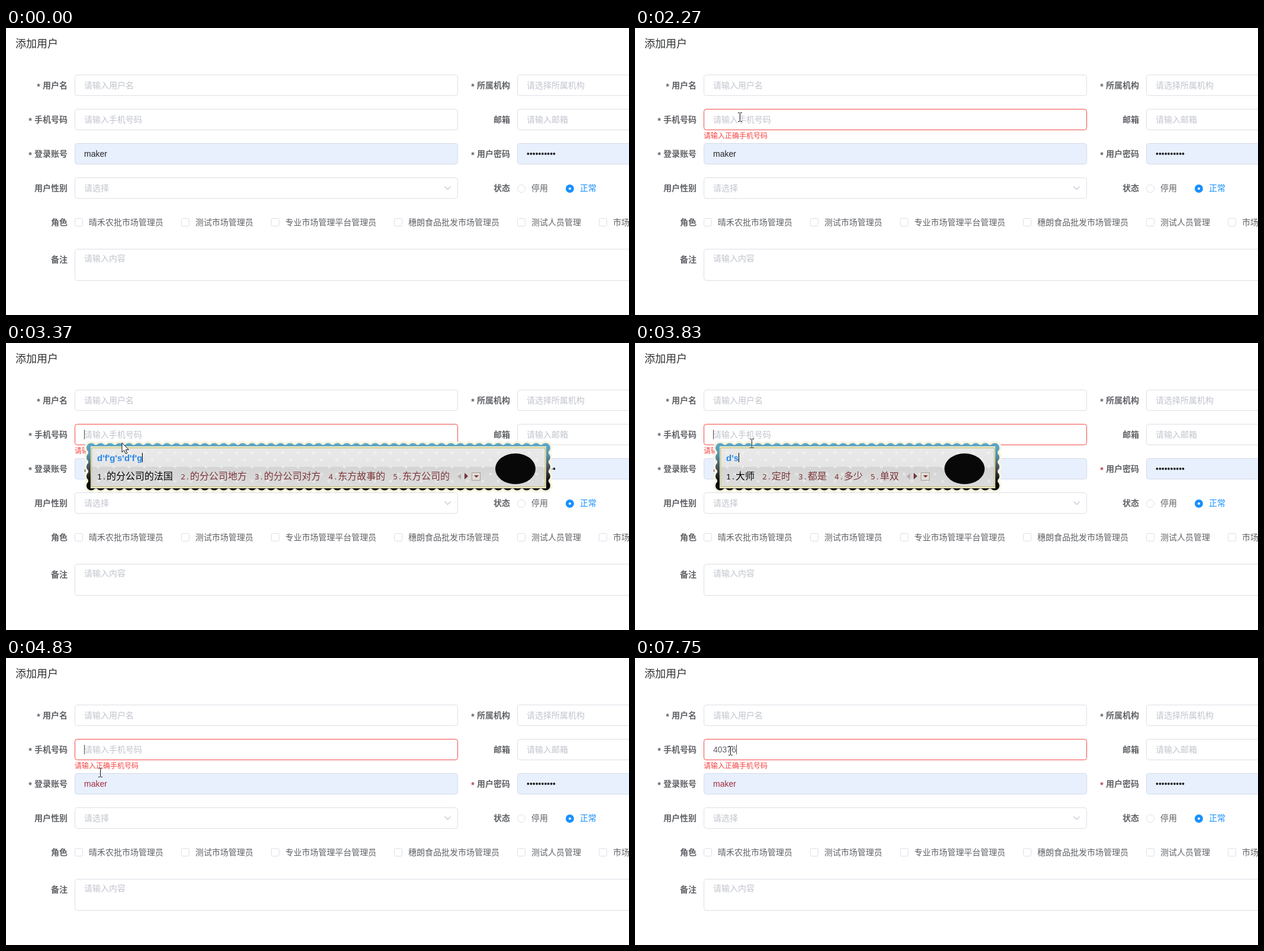
Animation of 1053x486 px, one loop 8 s. Source, as an HTML page:

```html
<!DOCTYPE html>
<html lang="zh-CN">
<head>
<meta charset="utf-8">
<title>添加用户</title>
<style>
html, body { margin: 0; width: 100%; height: 100%; overflow: hidden; background: #fff; }
svg { display: block; width: 1053px; height: 486px; }
text { font: 14px "Liberation Sans", "Noto Sans CJK SC", "Noto Sans CJK", sans-serif; fill: #606266; white-space: pre; }
.title { font-size: 18px; font-weight: 350; fill: #303133; }
.label { font-weight: 700; text-anchor: end; }
.star { font-weight: 700; }
.hint { fill: #c0c4cc; }
.light { font-weight: 300; }
.dark { fill: #222; }
.blue { fill: #1890ff; }
.error { font-size: 12px; fill: #f5413f; }
.box { fill: #fff; stroke: #dcdfe6; }
.filled { fill: #e8f0fe; stroke: #d5dbe8; }
.pinyin { font-size: 15px; font-weight: 700; fill: #2488ec; }
.cand { font-size: 16px; font-weight: 350; fill: #7c3438; }
.num { font: 13.33px "Noto Sans Mono", monospace; fill: #7c3438; }
.first { fill: #000; }
</style>
</head>
<body>
<svg viewBox="0 0 1053 486">
  <defs>
    <linearGradient id="edge" gradientUnits="userSpaceOnUse" x1="0" y1="169" x2="0" y2="250">
      <stop offset=".08" stop-color="#5ba5c5"/><stop offset=".25" stop-color="#5793ad"/>
      <stop offset=".55" stop-color="#454b50"/><stop offset=".8" stop-color="#0b0b0b"/>
    </linearGradient>
    <linearGradient id="panel" x1="0" y1="0" x2="0" y2="1">
      <stop offset="0" stop-color="#e9e9e9"/><stop offset=".48" stop-color="#e5e5e5"/>
      <stop offset=".5" stop-color="#d4d4d4"/><stop offset="1" stop-color="#dcdcdc"/>
    </linearGradient>
    <pattern id="dots" x="150" y="180" width="26" height="24" patternUnits="userSpaceOnUse">
      <g fill="#fff" opacity=".35"><circle cx="6" cy="6" r="2.6"/><circle cx="19" cy="18" r="2.6"/></g>
    </pattern>
  </defs>
  <g id="form"></g>
  <text id="value" x="132" y="160"></text>
  <path id="caret" stroke="#444" d="M.5 147v16"/>
  <g id="ime"></g>
  <circle id="click" r="12" fill="#fff33a" style="mix-blend-mode:multiply"/>
  <g id="mouse">
    <path id="arrow" d="M0 0V16L3.7 12.6 6.3 18.5 8.8 17.4 6.3 11.7H11.3Z" fill="#fff" stroke="#111"/>
    <g id="beam" fill="none">
      <path stroke="#fff" stroke-width="3" opacity=".5" d="M.5-7v14"/>
      <path stroke="#111" d="M-3-7.5H-.5L.5-6.5 1.5-7.5H4M.5-7V7M-3 7.5H-.5L.5 6.5 1.5 7.5H4"/>
    </g>
  </g>
</svg>
<script>
const $ = id => document.getElementById(id);
const LOOP = 8000;
const text = (x, y, s, cls = "", extra = "") => `<text x="${x}" y="${y}" class="${cls}" ${extra}>${s}</text>`;
const rect = (x, y, w, h, cls, extra = "") =>
  `<rect x="${x + .5}" y="${y + .5}" width="${w - 1}" height="${h - 1}" class="${cls}" ${extra}/>`;
const field = (x, y, cls = "", extra = "") => rect(x, y, 648, 36, "box " + cls, `rx="4" ${extra}`);

function label(right, y, s, required, starId = "") {
  const star = required ? text(right - s.length * 14 - 9.7, y + 2, "*", "star", `id="${starId}"`) : "";
  return star + text(right, y, s, "label");
}

function drawForm() {
  const roles = [[116, "晴禾农批市场管理员"], [296, "测试市场管理员"], [448, "专业市场管理平台管理员"],
    [656, "穗朗食品批发市场管理员"], [864, "测试人员管理"], [1002, "市场管理员"]];
  $("form").innerHTML =
    text(16, 33, "添加用户", "title") +
    label(104, 102, "用户名", true) + field(116, 79) + text(132, 102, "请输入用户名", "hint") +
    label(852, 102, "所属机构", true) + field(864, 79) + text(880, 102, "请选择所属机构", "hint") +
    label(104, 160, "手机号码", true) + field(116, 137, "", 'id="phone"') +
    text(132, 160, "请输入手机号码", "hint", 'id="hint"') +
    label(852, 160, "邮箱") + field(864, 137) + text(880, 160, "请输入邮箱", "hint") +
    text(116, 187, "请输入正确手机号码", "error", 'id="error"') +
    label(104, 218, "登录账号", true) + field(116, 195, "filled") + text(132, 218, "maker", "dark", 'id="account"') +
    label(852, 218, "用户密码", true, "star") + field(864, 195, "filled") + text(880, 218, "•".repeat(10), "dark") +
    label(104, 276, "用户性别") + field(116, 253) + text(132, 276, "请选择", "hint") +
    '<path d="M741.5 268.5l5 5 5-5" fill="none" stroke="#c0c4cc" stroke-width="1.2"/>' +
    label(852, 276, "状态") + '<circle cx="871" cy="272" r="6.5" class="box"/>' + text(888, 276, "停用") +
    '<circle cx="953" cy="272" r="7" class="blue"/><circle cx="953" cy="272" r="2" fill="#fff"/>' +
    text(970, 276, "正常", "blue") +
    label(104, 334, "角色") +
    roles.map(([x, s]) => rect(x, 322, 14, 14, "box", 'rx="2"') + text(x + 24, 334, s)).join("") +
    label(104, 397, "备注") + rect(116, 374, 1000, 54, "box", 'rx="4"') + text(132, 395, "请输入内容", "hint light");
}

// Input method states: start time, typed letters, candidates
const imeSteps = [
  [0, "", ""],
  [2820, "d", "的 大 地 都 到"],
  [2890, "df", "地方 对方 东方 大风 等"],
  [2960, "dfg", "东方故 地方官 东方 大风 的"],
  [3030, "dfgs", "东方故事 东方公司 地方公司 对方 的"],
  [3090, "dfgsd", "的分公司的 的分公司等 东方故事 东方公司 电饭锅"],
  [3180, "dfgsdf", "的分公司地方 的分公司对方 东方故事 东方公司 电饭锅"],
  [3250, "dfgsdfg", "的分公司的法国 的分公司地方 的分公司对方 东方故事的 东方公司的"],
  [3450, "dfgsdf", "的分公司地方 的分公司的 东方故事 东方公司 东方故事"],
  [3760, "d", "的 大 地 都 到"],
  [3830, "ds", "大师 定时 都是 多少 单双"],
  [3900, "dsf", "大师傅 第三方 都是 多少 单双"],
  [3970, "dsfd", "第三方的 大师傅的 第三方 大师傅 都是"],
  [4040, "dsfds", "第三方的是 大师傅都是 第三方的 大师傅的 第三方"],
  [4160, "", ""],
  [4230, "f", "飞 发 放 ︿(￣︶￣)︿ 否"],
  [4300, "fd", "饭店 放大 反对 发达 分段"],
  [4370, "fds", "放大师 发的是 饭店 放大 反对"],
  [4430, "f", "飞 发 放 ︿(￣︶￣)︿ 否"],
  [4560, "ds", "大师 定时 都是 多少 单双"],
  [4690, "", ""]
];

const charWidth = c => "()".includes(c) ? 8 : 16;

function drawIme(letters, list) {
  if (!letters) return $("ime").innerHTML = "";
  let x = 154, words = "";
  list.split(" ").forEach((word, i) => {
    const cls = i ? "" : " first";
    words += text(x, 231, i + 1 + ".", "num" + cls);
    x += 16;
    for (const c of word) {
      words += text(x, 231, c, "cand" + cls);
      x += charWidth(c);
    }
    x += 13;
  });
  const end = x - 13, right = end + 170;
  const outline = (color, width, extra = "") => `<rect x="144" y="177.5" width="${right - 152}" height="64"
    fill="none" stroke="${color}" stroke-width="${width}" ${extra}/>`;
  const scallop = (color, width) => outline(color, width, 'stroke-linecap="round" stroke-dasharray="0 16"');
  const panel = fill => `<rect x="145" y="178" width="${right - 154}" height="65" fill="${fill}"/>`;
  $("ime").innerHTML =
    scallop("#f7f4e0", 23) + outline("url(#edge)", 10) + scallop("url(#edge)", 16) +
    `<rect x="143" y="175" width="${right - 150}" height="71" fill="#f5f2d9"/>` +
    panel("url(#panel)") + panel("url(#dots)") +
    `<rect x="144.5" y="177.5" width="${right - 153}" height="66" fill="none" stroke="#c5c17c" stroke-width="1.5"/>` +
    text(154, 200, [...letters].join("'"), "pinyin", 'id="pinyin"') + words +
    `<path d="M${end + 19} 221v10l-6-5z" fill="#b5adad"/><path d="M${end + 25} 220v11l6-5.5z" fill="#713238"/>` +
    `<rect x="${end + 37.5}" y="219.5" width="14" height="13" fill="#e3ded8" stroke="#aaa096"/>` +
    `<path d="M${end + 41} 224h8l-4 4z" fill="#713238"/>` +
    `<ellipse cx="${right - 59}" cy="213" rx="34" ry="26" fill="#080808"/>`;
  const caretX = 154.5 + Math.round($("pinyin").getComputedTextLength());
  $("ime").insertAdjacentHTML("beforeend", `<path d="M${caretX} 186v16" stroke="#000"/>`);
}

const path = [[130, 816, 435], [400, 404, 300], [610, 257, 232], [760, 190, 189], [890, 165, 165],
  [1250, 165, 165], [1590, 64, 252], [1790, 64, 252], [2270, 177, 151], [2820, 177, 151],
  [2960, 196, 169], [3449, 196, 169], [3450, 197, 170], [4160, 197, 170], [4230, 197, 171],
  [4690, 197, 171], [5110, 82, 240], [5320, 82, 240], [5450, 80, 230], [5720, 161, 157], [LOOP, 161, 157]];
const clicks = [[1040, 1250], [1660, 1860], [2340, 2540], [5110, 5320], [5650, 5860]];
const carets = [[1040, 1660], [2340, 5110], [5650, 6260], [6530, LOOP]];
const digits = [[6530, 4], [6800, 0], [7000, 3], [7480, 7], [7750, 6]];

const within = (t, spans) => spans.some(([a, b]) => t >= a && t < b);
const show = (id, on) => $(id).style.display = on ? "" : "none";

// The pointer is sampled about every 70 ms
function pointerAt(t) {
  const i = Math.max(1, path.findIndex(p => p[0] > t));
  const [t0, x0, y0] = path[i - 1], [t1, x1, y1] = path[i];
  const k = Math.floor((t - t0) / 70) * 70 / (t1 - t0);
  return [x0 + (x1 - x0) * k, y0 + (y1 - y0) * k].map(Math.round);
}

function borderAt(t) {
  if (t < 1040) return "#dcdfe6";
  if (t < 1180) return "#9fbccd";
  return t < 1660 ? "#1890ff" : "#f24a48";
}

let lastIme = null;
function render(t) {
  const typed = digits.filter(d => t >= d[0]).map(d => d[1]).join("");
  $("value").textContent = typed;
  show("hint", !typed);
  show("error", t >= 1730);
  $("phone").style.stroke = borderAt(t);
  $("account").style.fill = t < 3760 ? "" : "#a12b3b";
  $("star").style.fill = t < 3760 ? "" : "#b04450";
  show("caret", within(t, carets));
  $("caret").setAttribute("transform", `translate(${132 + Math.round(typed.length * 7.79)})`);

  const step = imeSteps.filter(s => t >= s[0]).pop();
  if (step !== lastIme) {
    drawIme(step[1], step[2]);
    lastIme = step;
  }

  const [x, y] = pointerAt(t);
  const overText = x > 116 && x < 764 && y > 137 && y < 231 && !(t >= 2820 && t < 3450);
  show("mouse", t >= 130);
  show("beam", overText);
  show("arrow", !overText);
  $("mouse").setAttribute("transform", `translate(${x} ${y})`);
  show("click", within(t, clicks));
  $("click").setAttribute("transform", `translate(${x - 1} ${y - 1})`);
}

drawForm();
const start = performance.now();
(function frame() {
  render(Math.max(0, performance.now() - start) % LOOP);
  requestAnimationFrame(frame);
})();
</script>
</body>
</html>
```
